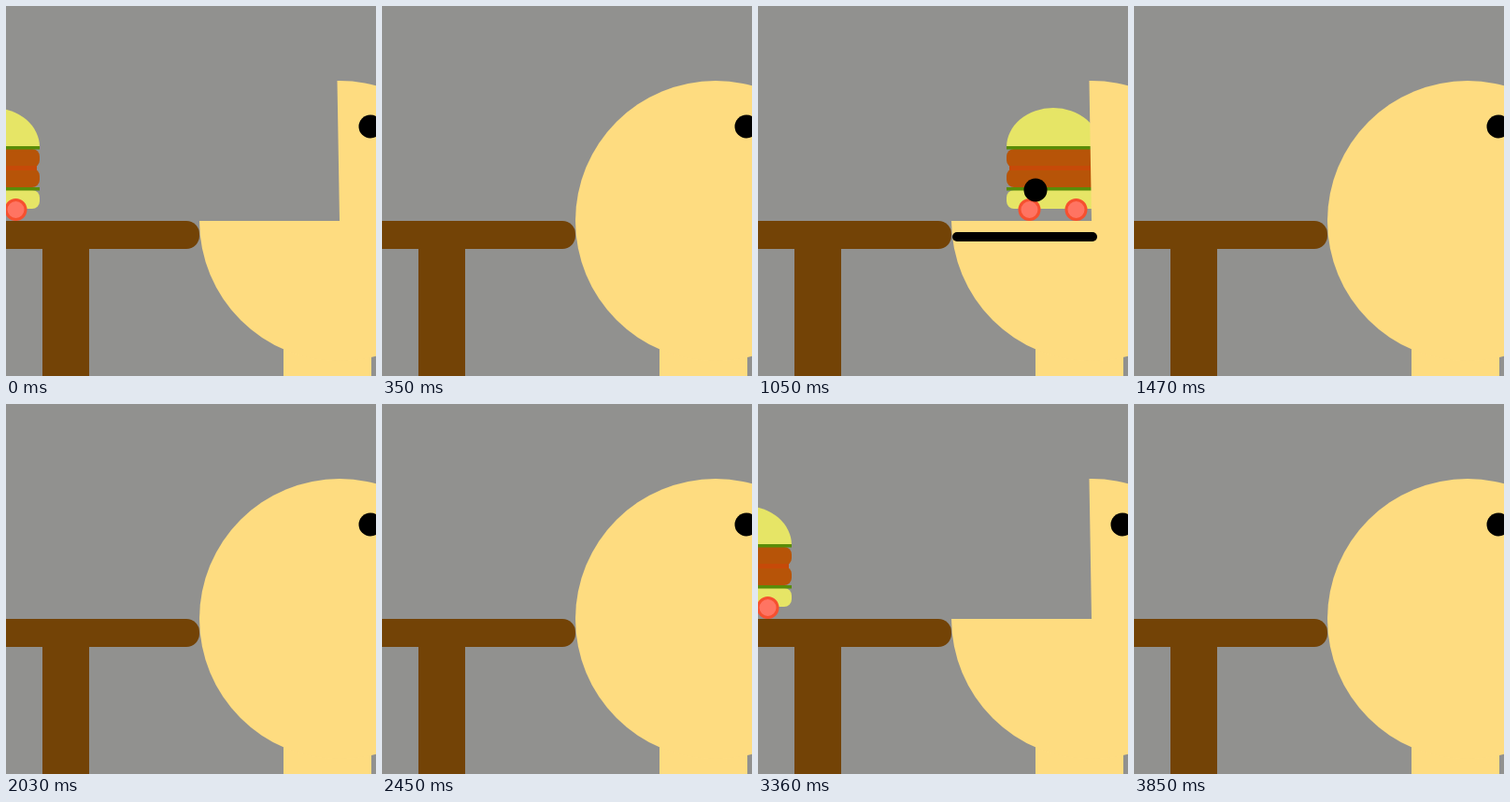
Animation of 396 by 396 pixels, one loop 3.92 s. Source, as an HTML page:

```html
<!DOCTYPE html>
<html lang="en">
<head>
<meta charset="utf-8">
<title>Burger delivery</title>
<style>
  html, body { margin: 0; width: 100%; height: 100%; overflow: hidden; background: #91918f; }
  svg { display: block; width: 396px; height: 396px; }
  .skin { fill: #fedc80; }
  .wood { fill: #734306; }
  .bun { fill: #e6e566; }
  .leaf { fill: #598c08; }
  .patty { fill: #b75408; }
  .sauce { fill: #c64a08; }
  .wheel { fill: #ff7462; stroke: #f6502f; stroke-width: 3; }
</style>
</head>
<body>
<svg viewBox="0 0 396 396">
  <rect class="wood" x="-40" y="230" width="247" height="30" rx="14"/>
  <rect class="wood" x="39" y="250" width="50" height="146"/>

  <g id="burger">
    <path class="bun" d="M0 151A50 42 0 0 1 100 151Z"/>
    <rect class="patty" y="153" width="100" height="20" rx="8"/>
    <rect class="patty" y="174" width="100" height="20" rx="8"/>
    <rect class="sauce" x="3" y="171" width="94" height="5"/>
    <rect class="bun" y="197" width="100" height="20" rx="8"/>
    <rect class="leaf" y="150" width="100" height="3.5"/>
    <rect class="leaf" y="194" width="100" height="3.5"/>
    <circle class="wheel" cx="24.5" cy="218" r="10.5"/>
    <circle class="wheel" cx="74.5" cy="218" r="10.5"/>
  </g>

  <rect class="skin" x="297" y="350" width="94" height="46"/>
  <circle id="shut" class="skin" cx="357" cy="230" r="150"/>
  <path id="open" class="skin" d="M357 230L354.5 80A150 150 0 1 1 207 230Z"/>
  <circle id="eye" r="12.5"/>
  <rect id="lip" x="208" y="242" width="155" height="10" rx="5"/>
</svg>
<script>
  const STEP = 70, LOOP = 3920, BITE = 12, RIDE = 4;
  const el = id => document.getElementById(id);
  const [burger, shut, open, eye, lip] = ['burger', 'shut', 'open', 'eye', 'lip'].map(el);
  const show = (node, on) => node.setAttribute('visibility', on ? 'visible' : 'hidden');

  function draw() {
    const phase = Math.floor(performance.now() % LOOP / STEP) % BITE;
    const riding = phase < RIDE;
    const biting = phase === RIDE - 1;

    burger.setAttribute('transform', `translate(${-64 + 110 * phase})`);
    show(burger, riding);
    show(open, riding);
    show(shut, !riding);
    show(lip, biting);
    eye.setAttribute('cx', biting ? 297 : 390);
    eye.setAttribute('cy', biting ? 197 : 129);
    requestAnimationFrame(draw);
  }
  draw();
</script>
</body>
</html>
```
